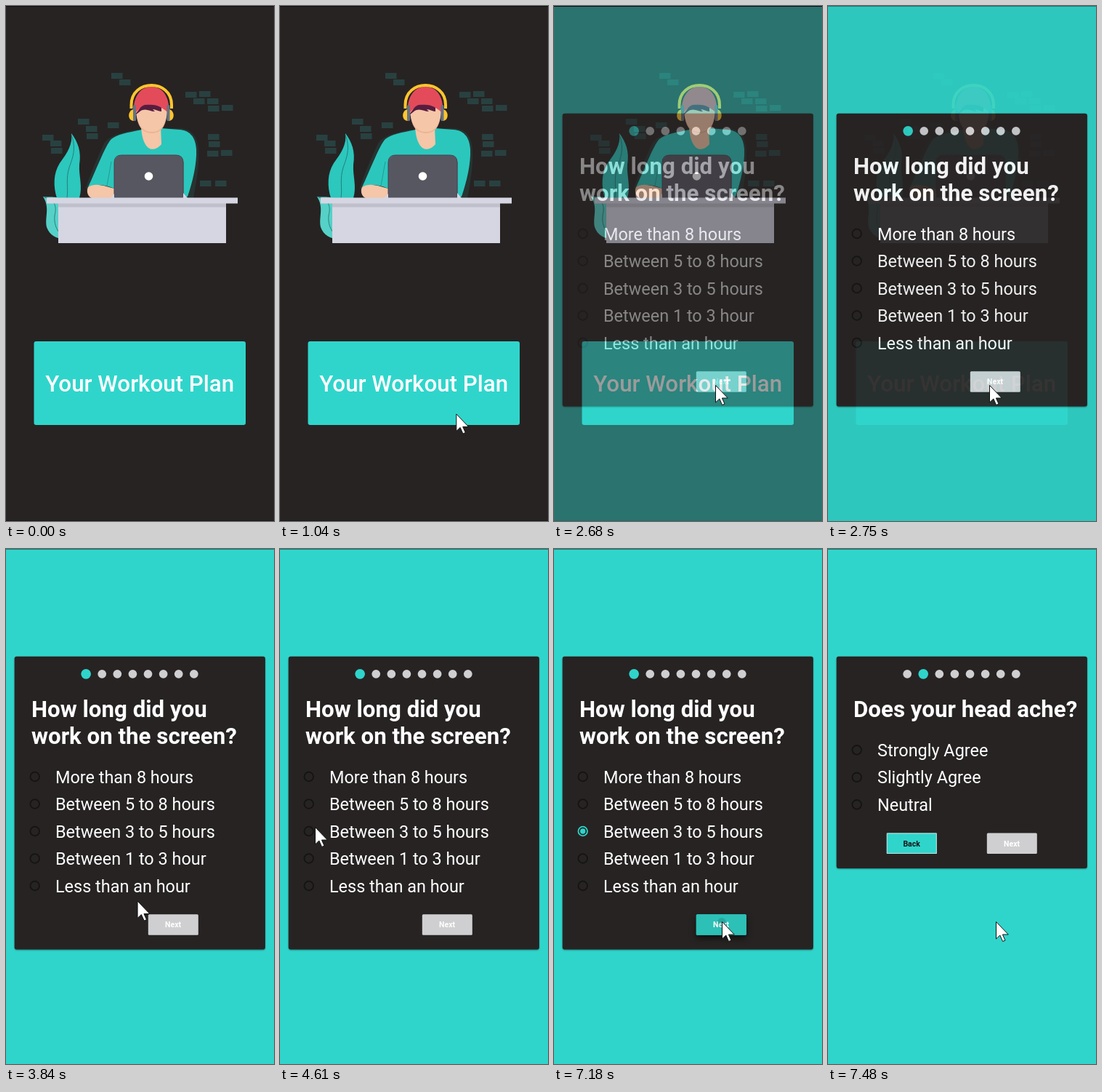
An HTML page with a canvas for the animation above (8 s loop, 369 by 708 pixels).

```html
<!DOCTYPE html>
<html lang="en">
<head>
<meta charset="utf-8">
<title>Workout plan</title>
<style>
html, body { margin: 0; width: 100%; height: 100%; overflow: hidden; background: #272323; }
canvas { display: block; width: 369px; height: 708px; }
</style>
</head>
<body>
<canvas id="stage"></canvas>
<script>
const W = 369, H = 708, LOOP = 8000;
const TEAL = '#2fd5cb', DARK = '#272323', GREY = '#cfcfd1', SKIN = '#f5c6a7', DESK = '#d6d6e3';
const FONT = 'Roboto, "Open Sans", sans-serif';
const TITLE = 31.27, BODY = 23.45, ROW = 37.5;

const canvas = document.getElementById('stage');
const c = canvas.getContext('2d');
const dpr = window.devicePixelRatio || 1;
canvas.width = W * dpr;
canvas.height = H * dpr;
c.scale(dpr, dpr);

const clamp = v => Math.max(0, Math.min(1, v));
const ramp = (t, a, b) => clamp((t - a) / (b - a));
const smooth = k => k * k * (3 - 2 * k);

function rect(x, y, w, h, fill, r = 0) {
  c.beginPath();
  c.roundRect(x, y, w, h, r);
  c.fillStyle = fill;
  c.fill();
}

function disc(x, y, r, fill) {
  c.beginPath();
  c.arc(x, y, r, 0, Math.PI * 2);
  c.fillStyle = fill;
  c.fill();
}

function ring(x, y, r, width, color) {
  c.beginPath();
  c.arc(x, y, r, 0, Math.PI * 2);
  c.lineWidth = width;
  c.strokeStyle = color;
  c.stroke();
}

function shape(d, fill) {
  c.fillStyle = fill;
  c.fill(new Path2D(d));
}

function line(d, color, width) {
  c.strokeStyle = color;
  c.lineWidth = width;
  c.stroke(new Path2D(d));
}

function text(str, x, y, size, weight, color = '#fff', align = 'left') {
  c.font = `${weight} ${size}px ${FONT}`;
  c.textAlign = align;
  c.fillStyle = color;
  c.fillText(str, x, y);
}

function withShadow(color, blur, dy, draw) {
  c.save();
  c.shadowColor = color;
  c.shadowBlur = blur * dpr;
  c.shadowOffsetY = dy * dpr;
  draw();
  c.restore();
}

// Illustration

const bricks = [
  [145, 92], [156, 101], [247, 118], [266, 117], [258, 127], [277, 127], [278, 137],
  [297, 136], [99, 155], [110, 165], [111, 175], [140, 160], [50, 177], [61, 185],
  [62, 195], [278, 176], [279, 186], [277, 199], [296, 198], [267, 240], [288, 240]
];

function drawPlant() {
  shape('M90 175 C99 187 104 200 101 218 C100 234 106 248 101 264 L70 264 C65 248 65 230 74 216 C85 201 92 190 90 175Z', '#2cc7bd');
  line('M90 177 C97 196 92 208 87 222 C82 238 86 250 84 264', '#257f7c', 1);
  shape('M51 262 C57 264 78 258 82 274 L82 320 C72 321 60 316 56 304 C53 290 61 278 51 262Z', '#56d1c8');
  line('M53 263 C68 266 70 276 67 288 C66 298 69 306 73 311', '#287e7b', 1);
}

function drawBody() {
  shape('M180 170 C158 174 141 179 135 189 C127 206 116 231 110 250 L118 264 L258 264 C262 243 266 220 265 200 C264 180 257 170 240 168Z', '#273432');
  shape('M187 170 C166 174 152 177 145 183 C137 191 124 226 113 249 C124 244 137 246 149 251 L149 264 L250 262 C257 242 263 216 262 197 C261 179 252 171 239 170 L213 168Z', '#2bc7bd');
  line('M145 214 L139 247', '#229b96', 1);
  shape('M113 249 C120 244 130 246 138 248 L149 251 L149 264 L118 264 C111 261 111 253 113 249Z', SKIN);
  shape('M186 166 L213 166 L214 190 C209 196 202 199 196 195 C190 190 187 181 186 166Z', SKIN);
}

function drawHead() {
  shape('M179 139 C179 161 185 175 201 175 C216 175 222 161 222 139Z', '#e9b595');
  shape('M179 138 C179 160 186 173 201 173 C215 173 222 160 222 138Z', SKIN);
  shape('M176 149 C174 128 183 111 200 111 C218 111 226 128 224 148 C222 145 218 142 214 140 L184 141Z', '#e34b5b');
  shape('M177 150 C182 145 185 137 191 136 C200 135 210 136 214 140 L214 145 C210 145 206 142 202 142 L205 145 C199 145 194 141 188 143 C184 144 182 148 177 150Z', '#571d3f');
  line('M172.5 141 L172.5 136 C172.5 100 228 100 228 136 L228 141', '#ffc62d', 4);
  shape('M176 142 C167 143 167 158 176 158Z M224 142 C233 143 233 158 224 158Z', '#ffc62d');
  rect(175, 136, 4, 22, '#667282', 1.5);
  rect(221.5, 136, 4, 22, '#667282', 1.5);
}

function drawHome() {
  rect(0, 0, W, H, DARK);
  bricks.forEach(([x, y]) => rect(x, y, 15.5, 8, '#284140'));
  drawPlant();
  drawBody();
  drawHead();
  rect(149, 205, 95.5, 60, '#575762', [10, 10, 0, 0]);
  line('M149 262 L149 215 Q149 205 159 205 L234 205 Q244 205 244 215 L244 262', '#44444e', 1);
  disc(196.5, 234, 5.8, '#fff');
  shape('M144 264 L149 258 L149 264Z M244 257 L250 264 L244 264Z', DESK);
  rect(72, 271, 231, 55, DESK);
  rect(72, 271, 231, 5.5, '#c0c0cc');
  rect(56, 263.5, 263, 8, DESK);
  rect(38.5, 461, 291.5, 115, TEAL, 3);
  text('Your Workout Plan', 184.2, 529.7, TITLE, 500, '#fff', 'center');
  rect(0, H - 1, W, 1, 'rgba(0,0,0,.35)');
}

// Questions

function drawCard(height, active) {
  rect(0, 0, W, H, TEAL);
  withShadow('rgba(0,0,0,.4)', 2, 1, () => rect(11.7, 147.7, 345.2, height, DARK, 3));
  for (let i = 0, x = 103.3; i < 8; i++) {
    const r = i === active ? 6.84 : 5.86;
    disc(x + r, 171.8, r, i === active ? TEAL : GREY);
    x += 2 * r + 9.38;
  }
}

function drawOptions(labels, y) {
  labels.forEach((label, i) => {
    ring(39.7, y + i * ROW, 6.3, 1.8, '#151313');
    text(label, 68, y + 8.6 + i * ROW, BODY, 400);
  });
}

function drawButton(label, x, y, fill, color = '#fff') {
  rect(x, y, 69, 28.5, fill, 1.5);
  text(label, x + 34.3, y + 18.2, 10.5, 700, color, 'center');
}

function drawRadio(t) {
  if (t < 5760) return;
  const k = ramp(t, 5700, 5920), fade = 1 - ramp(t, 5760, 6070);
  c.globalAlpha = 0.25 * fade;
  disc(39.7, 388, 17 * k, TEAL);
  c.globalAlpha = 1;
  ring(39.7, 388, 6.3, 1.8, TEAL);
  disc(39.7, 388, 3.7 * k, TEAL);
}

function drawFirst(t) {
  drawCard(402.7, 0);
  text('How long did you', 35, 231.2, TITLE, 700);
  text('work on the screen?', 35, 268.2, TITLE, 700);
  drawOptions(['More than 8 hours', 'Between 5 to 8 hours', 'Between 3 to 5 hours',
    'Between 1 to 3 hour', 'Less than an hour'], 313);
  drawRadio(t);
  const pressed = t >= 7090;
  const fill = t < 5760 ? GREY : pressed ? '#2cc0b6' : TEAL;
  if (pressed) withShadow('rgba(0,0,0,.6)', 8, 4, () => rect(195.8, 502.2, 69, 28.5, fill, 1.5));
  drawButton('Next', 195.8, 502.2, fill);
  if (pressed) disc(231, 513, Math.min(14, (t - 7090) * 0.065), 'rgba(0,0,0,.12)');
}

function drawSecond() {
  drawCard(291.2, 1);
  text('Does your head ache?', 35, 231.2, TITLE, 700);
  drawOptions(['Strongly Agree', 'Slightly Agree', 'Neutral'], 276.3);
  drawButton('Back', 80.8, 390.5, TEAL, '#171414');
  c.lineWidth = 1;
  c.strokeStyle = '#c5dedd';
  c.strokeRect(81.3, 391, 68, 27.5);
  drawButton('Next', 218.8, 390.5, GREY);
}

// Pointer

const path = [
  [540, 309, 690], [1270, 222, 521], [3620, 222, 521], [4300, 55, 370], [4460, 52, 383],
  [4610, 48, 382], [5150, 40, 384], [6140, 40, 384], [6450, 235, 524], [6540, 235, 524],
  [6770, 231, 512], [LOOP, 231, 512]
];

function pointerAt(t) {
  const i = path.findIndex(p => p[0] > t);
  const [t0, x0, y0] = path[i - 1], [t1, x1, y1] = path[i];
  const k = smooth(ramp(t, t0, t1));
  return [x0 + (x1 - x0) * k, y0 + (y1 - y0) * k];
}

const clicks = [[2200, 2370], [5610, 5760], [6940, 7090]];

function drawPointer(t) {
  if (t < 580) return;
  const [x, y] = pointerAt(t);
  c.save();
  c.translate(x, y);
  const arrow = 'M.5 .5 L.5 24 L5.8 19 L9.6 27.5 L13 26 L9.4 18 L17.3 18Z';
  shape(arrow, '#fff');
  line(arrow, '#111', 1);
  c.restore();
  if (clicks.some(([a, b]) => t >= a && t < b)) disc(x, y, 18, 'rgba(255,255,0,.5)');
}

// Blends the new screen over the current one as a single layer.
const under = document.createElement('canvas');
under.width = canvas.width;
under.height = canvas.height;
const underCtx = under.getContext('2d');

function blend(alpha, draw) {
  underCtx.drawImage(canvas, 0, 0);
  draw();
  c.globalAlpha = 1 - alpha;
  c.drawImage(under, 0, 0, W, H);
  c.globalAlpha = 1;
}

function render(t) {
  if (t < 2830) drawHome();
  if (t >= 2680 && t < 2830) {
    const alpha = 0.45 + 0.48 * ramp(t, 2680, 2750);
    blend(alpha, () => drawFirst(t));
  } else if (t >= 2830 && t < 7320) {
    drawFirst(t);
  } else if (t >= 7320) {
    drawSecond();
  }
  rect(0, 0, W, 1, t < 2750 ? '#0f0d0d' : '#1f7f79');
  drawPointer(t);
}

const start = performance.now();

function tick() {
  render((performance.now() - start) % LOOP);
  requestAnimationFrame(tick);
}

tick();
</script>
</body>
</html>
```
